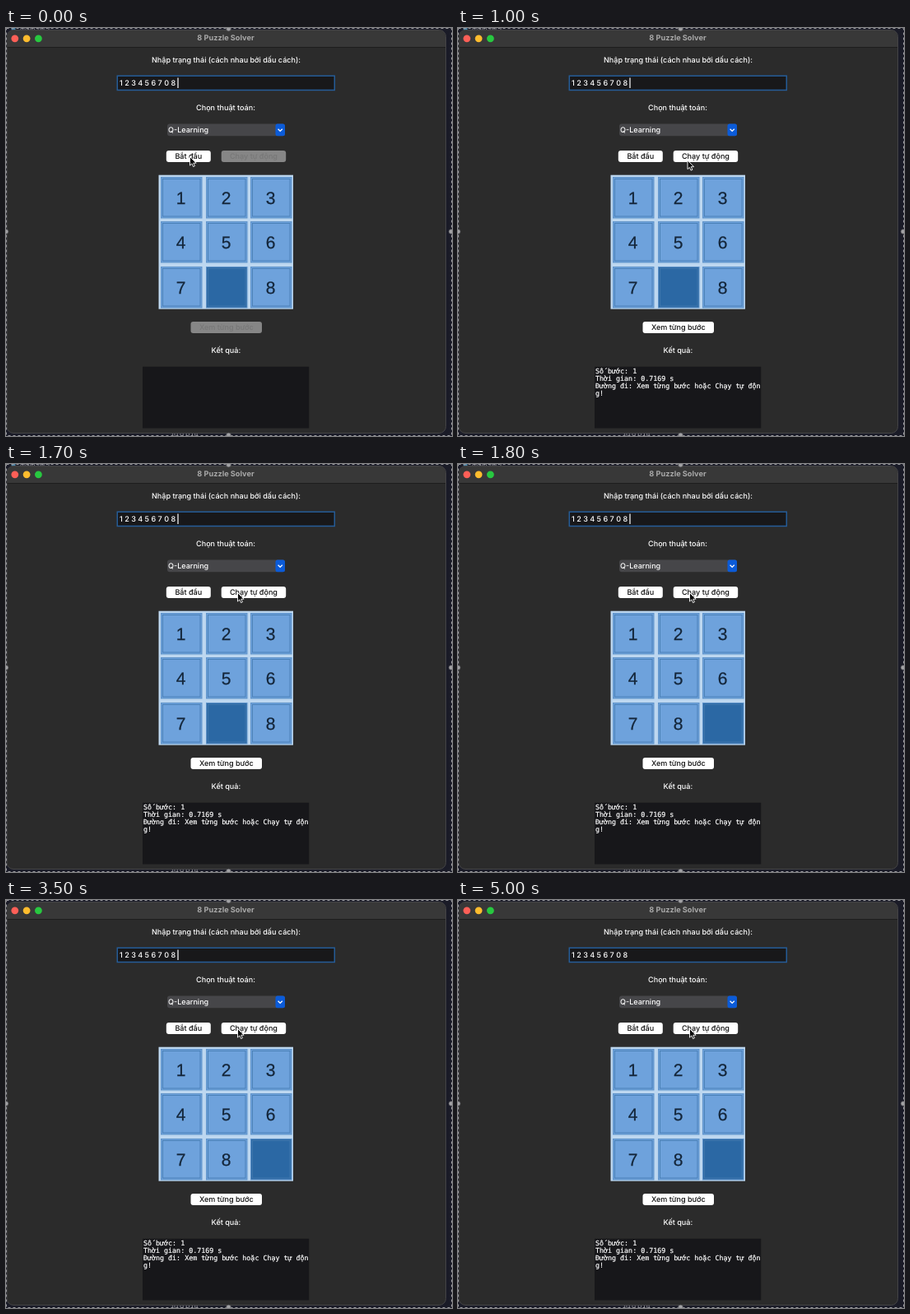
These frames come from a looping animation (542x496 px, 5.1 s). An HTML page:

```html
<!DOCTYPE html>
<html lang="vi">
<head>
<meta charset="utf-8">
<title>8 Puzzle Solver</title>
<style>
  html, body { margin: 0; width: 100%; height: 100%; overflow: hidden; background: #1a1b27; }
  svg { display: block; width: 542px; height: 496px; }
  text { font: 500 9.05px Inter, Roboto, sans-serif; fill: #fff; white-space: pre; text-rendering: geometricPrecision; }
  .mid { text-anchor: middle; }
  .title { font-weight: 700; font-size: 9.2px; fill: #a9a9a9; }
  .digit { font: 21px "Liberation Sans", Arial, sans-serif; fill: #14263a; stroke: #14263a; stroke-width: .25; }
  .mono { font: 8.33px "DejaVu Sans Mono", monospace; stroke: #fff; stroke-width: .2; }
  .behind { font-size: 8px; fill: #85858c; }
</style>
</head>
<body>
<svg id="stage" viewBox="0 0 542 496" xmlns="http://www.w3.org/2000/svg">
  <rect width="542" height="496" fill="#1a1b27"/>
  <g id="tab">
    <circle cx="9" cy="1" r="2.5" fill="#4d87ab"/>
    <text class="behind" x="17" y="4">main.py 7</text>
  </g>
  <text class="behind" x="201" y="497">(0,0,0,0)</text>

  <rect x="1" y="2.5" width="533.5" height="490" rx="8" fill="#2b2b2b" stroke="#444446"/>
  <path d="M1.5 23V10.5a7.5 7.5 0 0 1 7.5-7.5H526.5a7.5 7.5 0 0 1 7.5 7.5V23Z" fill="#383838"/>
  <path d="M1.5 23.5H534" stroke="#1d1d1d"/>
  <rect x=".5" y=".5" width="541" height="495" fill="none" stroke="#9a9a9f" stroke-dasharray="3 3"/>
  <g id="handles" fill="#a3a3a6" stroke="#55555a" stroke-width=".7"></g>

  <g id="lights"></g>
  <text class="mid title" x="267" y="15.3">8 Puzzle Solver</text>

  <text class="mid" x="267.5" y="42.4">Nhập trạng thái (cách nhau bởi dấu cách):</text>
  <rect x="135.3" y="58.2" width="264" height="17.3" fill="#18181a" stroke="#255c98" stroke-width="1.5"/>
  <text x="138" y="70.2">1 2 3 4 5 6 7 0 8</text>
  <path id="caret" d="M209 60.5V73" stroke="#fff" stroke-width="1.2"/>

  <text class="mid" x="267" y="99.7">Chọn thuật toán:</text>
  <rect x="196" y="116.5" width="143" height="14.7" rx="3" fill="#464649"/>
  <rect x="327.5" y="116.5" width="11.5" height="14.7" rx="2.5" fill="#0b5bd8"/>
  <path d="M330.6 122.8L333.2 125.4L335.8 122.8" fill="none" stroke="#fff" stroke-width="1.3"/>
  <text x="197" y="127.3">Q-Learning</text>

  <g id="buttons"></g>
  <rect x="185.5" y="178.7" width="163.5" height="163" fill="#bdd7f0"/>
  <g id="board"></g>

  <text class="mid" x="267.4" y="395.4">Kết quả:</text>
  <rect x="166" y="411.7" width="202.3" height="74.8" fill="#17171a"/>
  <g id="output"></g>

  <path id="cursor" d="M0 0V10.6L2.4 8.4L4 12.1L5.9 11.3L4.3 7.7H7.6Z"
        fill="#0b0b0b" stroke="#fff" stroke-width=".9" stroke-linejoin="round"/>
</svg>

<script>
const LOOP = 5100, STEP = 100;
const $ = id => document.getElementById(id);

function add(parent, tag, attrs, text) {
  const el = document.createElementNS("http://www.w3.org/2000/svg", tag);
  for (const key in attrs) el.setAttribute(key, attrs[key]);
  if (text) el.textContent = text;
  return parent.appendChild(el);
}

function show(el, on) {
  el.style.display = on ? "" : "none";
}

function button(x, y, width, label) {
  const box = add($("buttons"), "rect", { x, y, width, height: 14, rx: 3 });
  const text = add($("buttons"), "text", { x: x + width / 2, y: y + 10.2, class: "mid" }, label);
  return on => {
    box.style.fill = on ? "#fff" : "#868686";
    text.style.fill = on ? "#0c0c0c" : "#777";
  };
}

function tile(index) {
  const x = 188 + Math.round((index % 3) * 54.5);
  const y = 181 + Math.round(Math.floor(index / 3) * 54.4);
  const g = add($("board"), "g", { transform: `translate(${x} ${y})` });
  const face = add(g, "rect", { x: .5, y: .5, width: 49.5, height: 49.5, stroke: "#5f93c9" });
  add(g, "rect", { x: 2.5, y: 2.5, width: 45.5, height: 45.5, fill: "none", stroke: "#4379ae", "stroke-width": .8 });
  const digit = add(g, "text", { x: 24.7, y: 32.6, class: "mid digit" });
  return n => {
    face.style.fill = n ? "#6ea2dc" : "#2b68a4";
    digit.textContent = n || "";
  };
}

for (const [cx, cy] of [[0, 247.5], [541, 247.5], [270.5, 1], [270.5, 495]])
  add($("handles"), "circle", { cx, cy, r: 2.8 });

["#fe5f57", "#febc2e", "#28c840"].forEach((fill, i) =>
  add($("lights"), "circle", { cx: 10.8 + i * 14.3, cy: 12.8, r: 4.4, fill }));

button(194.8, 149, 54, "Bắt đầu")(true);
const actions = [button(261.7, 149, 78.5, "Chạy tự động"), button(224.5, 357, 86.5, "Xem từng bước")];
const tiles = Array.from({ length: 9 }, (_, i) => tile(i));

["Số bước: 1", "Thời gian: 0.7169 s", "Đường đi: Xem từng bước hoặc Chạy tự độn", "g!"]
  .forEach((line, i) => add($("output"), "text", { x: 167, y: 419.6 + i * 9.25, class: "mono" }, line));

// time, x, y of the pointer tip
const path = [
  [0, 223.5, 156.5], [100, 225, 157], [500, 225, 157],
  [1000, 279, 161], [1300, 283, 160], [1600, 281.5, 156.5], [LOOP, 281.5, 156.5]
];

function pointer(t) {
  const i = path.findIndex(p => p[0] > t);
  const [t0, x0, y0] = path[i - 1], [t1, x1, y1] = path[i];
  const p = (t - t0) / (t1 - t0), k = p * p * (3 - 2 * p);
  return [x0 + (x1 - x0) * k, y0 + (y1 - y0) * k];
}

function draw(now) {
  const t = Math.floor((now % LOOP) / STEP) * STEP;
  const solved = t >= 500, moved = t >= 1800;
  show($("caret"), (t + 100) % 900 < 600);
  show($("output"), solved);
  show($("tab"), t < 3000);
  actions.forEach(set => set(solved));
  [1, 2, 3, 4, 5, 6, 7, moved ? 8 : 0, moved ? 0 : 8].forEach((n, i) => tiles[i](n));
  $("cursor").setAttribute("transform", `translate(${pointer(t)})`);
}

const start = performance.now();
function frame() {
  draw(performance.now() - start);
  requestAnimationFrame(frame);
}
frame();
</script>
</body>
</html>
```
